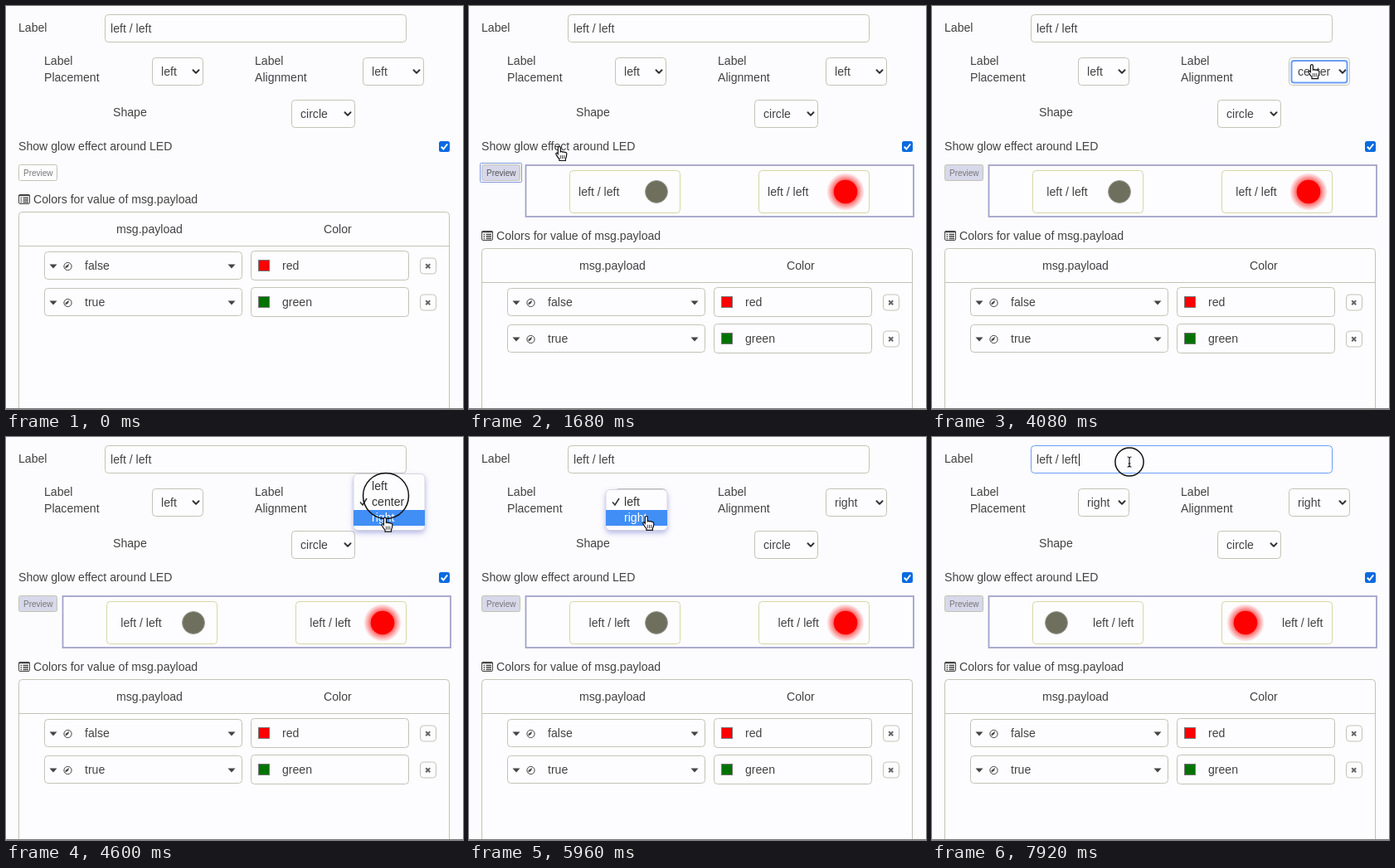
Animation of 551 by 486 pixels, one loop 8 s. Source, as an HTML page:

```html
<!DOCTYPE html>
<html lang="en">
<head>
<meta charset="utf-8">
<title>LED settings</title>
<style>
html, body { margin: 0; width: 100%; height: 100%; overflow: hidden; background: #fcfcfe; }
svg { display: block; width: 551px; height: 486px; }
text { font: 14.1px "Liberation Sans", Arial, sans-serif; fill: #424242; white-space: pre; }
.box { fill: #fdfdff; stroke: #c3c3b6; }
.focus { fill: none; stroke: #6a9df3; stroke-width: 2; }
.small { font-size: 10px; fill: #777; }
.chev { fill: none; stroke: #333; stroke-width: 2; stroke-linecap: round; stroke-linejoin: round; }
</style>
</head>
<body>
<svg id="stage" viewBox="0 0 551 486">
  <defs>
    <radialGradient id="glow">
      <stop offset=".6" stop-color="#f00" stop-opacity=".62"/>
      <stop offset=".8" stop-color="#f00" stop-opacity=".3"/>
      <stop offset="1" stop-color="#f00" stop-opacity="0"/>
    </radialGradient>
    <filter id="shade" x="-20%" y="-20%" width="140%" height="150%">
      <feDropShadow dx="0" dy="3" stdDeviation="3" flood-color="#66c" flood-opacity=".45"/>
    </filter>
  </defs>
</svg>
<script>
const LOOP = 8000, OPTIONS = ['left', 'center', 'right'];
const stage = document.getElementById('stage');
const $ = id => document.getElementById(id);

const text = (x, y, s, extra = '') => `<text x="${x}" y="${y}" ${extra}>${s}</text>`;
const rect = (x, y, w, h, extra = 'class="box"', r = 4) =>
  `<rect x="${x}" y="${y}" width="${w}" height="${h}" rx="${r}" ${extra}/>`;
const path = (d, extra = '') => `<path d="${d}" ${extra}/>`;

const select = (id, x, y, w, value) => `<g transform="translate(${x} ${y})">
  ${rect(.5, .5, w - 1, 33)}${text(11, 22, value, `id="${id}Text"`)}
  ${path(`M${w - 12.5} 15.3l3.5 3.6 3.5-3.6`, 'class="chev"')}
  ${rect(3.5, 4, w - 7, 26.5, `id="${id}Focus" class="focus"`, 3)}</g>`;

const row = (y, value, fill, name) => `<g transform="translate(0 ${y})">
  ${rect(46.5, .5, 238, 33)}${rect(295.5, -.5, 190, 35)}
  ${path('M52.5 15.5h9l-4.5 5z', 'fill="#444"')}
  <circle cx="74.5" cy="18" r="4.6" fill="none" stroke="#444"/>
  ${path('M71.6 20.8V18l4.5-3.2-1 3.4-3.5 2.6z', 'fill="#444"')}
  ${text(95, 22, value)}${path('M267.5 15.5h9l-4.5 5z', 'fill="#444"')}
  ${rect(304.5, 10.5, 13, 13, `fill="${fill}" stroke="#777"`, 0)}${text(333, 22, name)}
  ${rect(499.5, 8, 19, 19)}
  ${path('M506.2 15.2l5 5m0-5l-5 5', 'stroke="#666" stroke-width="2"')}</g>`;

const card = (x, lit) => `<g transform="translate(${x} 198)">
  ${rect(.5, .5, 133, 51, 'fill="#fdfdff" stroke="#d6d6a6"')}
  ${text(11, 31, 'left / left', 'class="cardText"')}
  <g class="led">${lit
    ? '<circle r="23" fill="url(#glow)"/><circle r="14.3" fill="#f00"/>'
    : '<circle r="13.5" fill="#6f6f5d" stroke="#9d9d98"/>'}</g></g>`;

stage.insertAdjacentHTML('beforeend', `
  ${text(15, 31, 'Label')}
  ${rect(119.5, 10.5, 363, 33, 'id="field" class="box"')}
  ${text(126, 32, 'left / left')}
  ${path('M177.5 20v15', 'id="caret" stroke="#222"')}
  ${text(46, 71, 'Label')}${text(46, 91, 'Placement')}${select('place', 176, 62, 62, 'left')}
  ${text(300, 71, 'Label')}${text(300, 91, 'Alignment')}${select('align', 430, 62, 74, 'left')}
  ${text(129, 133, 'Shape')}${select('shape', 344, 113, 77, 'circle')}
  ${text(15, 174, 'Show glow effect around LED')}
  ${rect(522, 163, 13, 13, 'fill="#0a6ae0"', 2.5)}
  ${path('M524.8 169.8l2.6 2.7 4.8-6', 'fill="none" stroke="#fff" stroke-width="2"')}
  ${rect(13.5, 189.5, 50, 23, 'id="btnFocus" fill="#fff" stroke="#7d97dc"', 1)}
  ${rect(15.5, 191.5, 46, 19, 'id="btn" class="box"', 2)}
  ${text(21, 205, 'Preview', 'class="small" id="btnText"')}
  <g id="preview">
    ${rect(68.5, 192, 467.5, 62, 'fill="#fdfdff" stroke="#a2a2cb" stroke-width="1.8"', 0)}
    ${card(121, false)}${card(349, true)}
  </g>
  <g id="table">
    ${rect(15.5, 227.5, 13, 11, 'fill="none" stroke="#444"', 1.5)}
    ${path('M15 228.5h14M17.5 231.5h1.5m1.5 0h6.5M17.5 234h1.5m1.5 0h6.5M17.5 236.5h1.5m1.5 0h6.5', 'stroke="#444" stroke-width="1.4"')}
    ${text(33, 238, 'Colors for value of msg.payload')}
    ${rect(15.5, 248.5, 519, 300)}
    ${path('M16 289.5h518', 'stroke="#c3c3b6"')}
    ${text(133, 274, 'msg.payload')}${text(383, 274, 'Color')}
    ${row(296, 'false', '#f00', 'red')}${row(340, 'true', '#007300', 'green')}
  </g>
  ${path('M0 485.5h551', 'stroke="#777"')}
  <g id="popup"></g>
  <circle id="ring" fill="none" stroke="#111" stroke-width="1.5"/>
  <g id="cursor" stroke="#111" stroke-linecap="round">
    <g id="hand">
      ${path('M-1.6 8.5V1.2a1.5 1.5 0 0 1 3 0V6q1.4-1 2.6.3q1.4-.8 2.5.4q2.3-.4 2.4 1.8c0 3-.6 4.5-1.4 6v2.2H0v-2q-2-2-3.8-5.4c-1-2 .8-2.8 2.2-.8z', 'fill="#fff" stroke-width="1.2"')}
      ${path('M1.4 10.5v3.5M3.6 10.5v3.5M5.8 10.5v3.5', 'stroke-width=".8"')}
    </g>
    ${path('M-2-6q2 0 2 2v8q0 2-2 2M2-6q-2 0-2 2M0 4q0 2 2 2M-1 2h2', 'id="beam" fill="none" stroke-width="1.1"')}
  </g>`);

// time, x, y, sideways bow of the stretch leading here
const MOVES = [
  [110, 215, 21], [480, 32, 194], [1400, 32, 194], [2430, 453, 78, -5],
  [3200, 453, 78], [3500, 457, 98], [3800, 457, 98], [4040, 458, 71],
  [4400, 458, 71], [4620, 457, 98], [4820, 457, 98], [5408, 209, 80, 7.4],
  [5740, 209, 80], [5980, 214, 96], [6840, 214, 96], [7520, 238, 30], [LOOP, 238, 30]
];
const CLICKS = [500, 2773, 3600, 4300, 4680, 5560, 6060, 7753];
const OPENED = 620;
// start, end, select x, width, options, chosen index
const POPUPS = [
  [2790, 3740, 430, 74, OPTIONS, 0],
  [4320, 4800, 430, 74, OPTIONS, 1],
  [5580, 6180, 176, 62, ['left', 'right'], 0]
];

function cursorAt(t) {
  const i = Math.max(1, MOVES.findIndex(m => m[0] > t));
  const [t0, x0, y0] = MOVES[i - 1], [t1, x1, y1, bow = 0] = MOVES[i];
  const u = Math.min(1, Math.max(0, (t - t0) / (t1 - t0)));
  const p = u * u * (3 - 2 * u);
  return [x0 + (x1 - x0) * p, y0 + (y1 - y0) * p + bow * 4 * p * (1 - p)];
}

function popupAt(t, y) {
  const open = POPUPS.find(p => t >= p[0] && t < p[1]);
  if (!open) return '';
  const [, , x, w, items, chosen] = open;
  const mid = i => 78.5 + 19 * (i - chosen);
  const left = x - 11, width = w + 12;
  return rect(left, mid(0) - 15, width, 19 * items.length + 11, 'fill="#fdfdff" stroke="#c9c9d6" stroke-width=".7" filter="url(#shade)"', 5) +
    items.map((name, i) => {
      const hot = Math.abs(y - mid(i)) <= 9.5, c = hot ? '#fff' : '#333';
      return (hot ? rect(left, mid(i) - 9.5, width, 19, 'fill="#418ff5"', 0) : '') +
        (i === chosen ? path(`M${x - 3} ${mid(i)}l3 3.5 5-8`, `fill="none" stroke="${c}" stroke-width="1.6"`) : '') +
        text(x + 11, mid(i) + 4.5, name, `style="fill:${c}"`);
    }).join('');
}

const show = (id, on) => $(id).setAttribute('visibility', on ? 'visible' : 'hidden');
const between = (t, a, b) => t >= a && t < b;
let popupHtml = '';

function draw(t) {
  const [x, y] = cursorAt(t);
  const opened = t >= OPENED, focused = t >= 7753;
  const align = t < 3740 ? 0 : t < 4800 ? 1 : 2;
  const swapped = t >= 6180;

  show('preview', opened);
  $('table').setAttribute('transform', `translate(0 ${opened ? 44 : 0})`);
  $('btn').style.fill = t >= 500 ? '#d7d8e9' : '';
  $('btnText').style.fill = between(t, 500, 2773) ? '#555' : '';
  show('btnFocus', between(t, 500, 2773));

  $('alignText').textContent = OPTIONS[align];
  $('placeText').textContent = swapped ? 'right' : 'left';
  show('alignFocus', between(t, 2773, 5560));
  show('placeFocus', between(t, 5560, 7753));
  show('shapeFocus', false);

  for (const el of document.querySelectorAll('.cardText'))
    el.setAttribute('x', swapped ? 73 : 11 + 6.3 * align);
  for (const el of document.querySelectorAll('.led'))
    el.setAttribute('transform', `translate(${swapped ? 29 : 105} 26)`);

  $('field').style.stroke = focused ? '#6a9df3' : '';
  show('caret', focused);

  const html = popupAt(t, y);
  if (html !== popupHtml) $('popup').innerHTML = popupHtml = html;

  const click = CLICKS.find(c => between(t, c, c + 365));
  show('ring', click !== undefined);
  if (click !== undefined) {
    const [cx, cy] = cursorAt(click);
    $('ring').setAttribute('cx', cx);
    $('ring').setAttribute('cy', cy);
    $('ring').setAttribute('r', 4 + (t - click) * .078);
  }

  const typing = between(x, 119, 483) && y < 43, seen = t >= 120;
  $('cursor').setAttribute('transform', `translate(${x} ${y})`);
  show('hand', seen && !typing);
  show('beam', seen && typing);
}

const start = performance.now();
function tick() {
  draw((performance.now() - start) % LOOP);
  requestAnimationFrame(tick);
}
tick();
</script>
</body>
</html>
```
